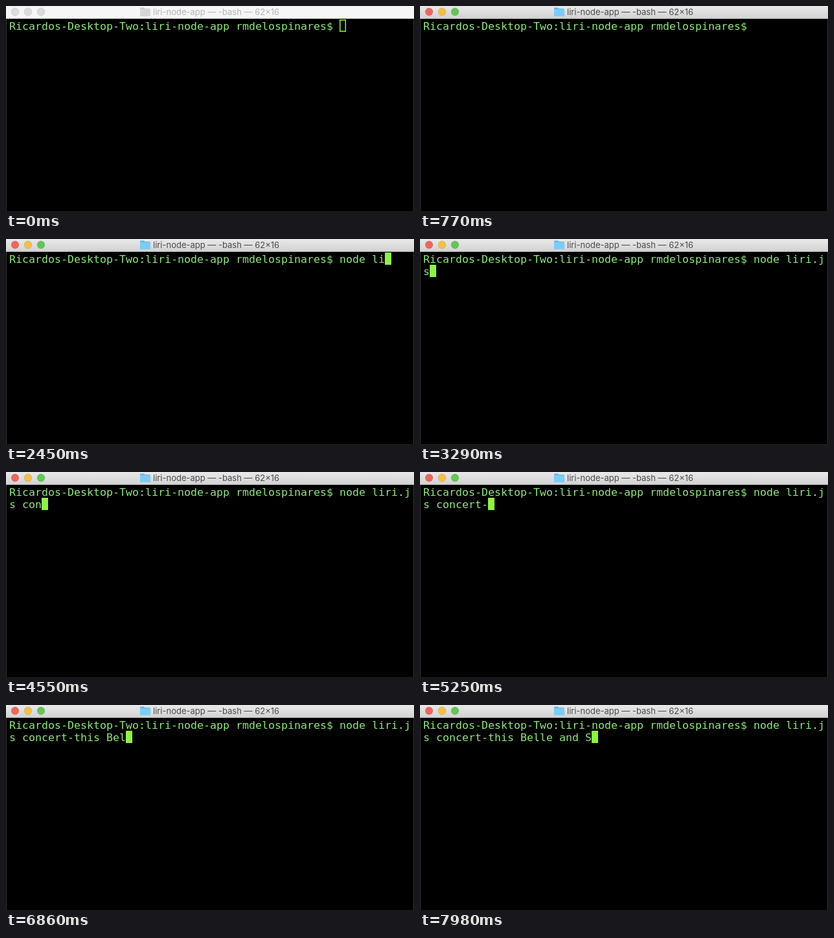
Recreate the animation shown at these times as an HTML page. Size 630x318 px, loop 8 s.

```html
<!DOCTYPE html>
<html lang="en">
<head>
<meta charset="utf-8">
<title>Terminal</title>
<style>
  html, body { margin: 0; width: 100%; height: 100%; overflow: hidden; background: #000; }
  svg { display: block; width: 630px; height: 318px; }
  .line { font: 300 16.61px "DejaVu Sans Mono", monospace; fill: #8fe67c; white-space: pre; }
  .title { font: 13px Inter, "Liberation Sans", sans-serif; fill: #4b4b4b; }
  .lamp { stroke-width: .7; stroke: rgba(0, 0, 0, .16); }
  .folder { fill: #7cccf6; }
  .folder-top { fill: #5fb8ea; }
  .inactive .title { fill: #b5b5b5; }
  .inactive .lamp { fill: #dcdcdc; stroke: #cacaca; }
  .inactive .folder { fill: #d6d6d6; }
  .inactive .folder-top { fill: #cbcbcb; }
  .inactive .bar { fill: #f6f6f6; }
</style>
</head>
<body>
<svg viewBox="0 0 630 318">
  <defs>
    <linearGradient id="chrome" x2="0" y2="1">
      <stop offset="0" stop-color="#e9e9e9"/>
      <stop offset="1" stop-color="#d1d1d1"/>
    </linearGradient>
  </defs>
  <rect width="630" height="318"/>
  <path d="M.5 20V318M629.5 20V318" stroke="#333"/>
  <g id="header">
    <rect class="bar" width="630" height="20" fill="url(#chrome)"/>
    <rect y="19" width="630" height="1" fill="#b4b4b4"/>
    <circle class="lamp" cx="14" cy="9" r="5.9" fill="#f0655b"/>
    <circle class="lamp" cx="34" cy="9" r="5.9" fill="#f5bf45"/>
    <circle class="lamp" cx="54" cy="9" r="5.9" fill="#62c754"/>
    <path class="folder-top" d="M207 15V4q0-1.500 1.500-1.500h4.500l1.500 1.500h6.500q2 0 2 1.500V15z"/>
    <rect class="folder" x="207" y="5" width="16" height="11" rx="1"/>
    <text class="title" x="227" y="14">liri-node-app — -bash — 62×16</text>
  </g>
  <rect id="cursor" width="10" height="19"/>
  <text id="row0" class="line" x="5" y="37"></text>
  <text id="row1" class="line" x="5" y="56"></text>
</svg>
<script>
const LOOP = 8000, COLS = 62, CELL = 10, LEFT = 5, TOP = 21, ROW = 19;
const FOCUS = 70, FADE_OUT = 560, FADE_IN = 1330, TICK = 70;
const GREEN = '#8ff147';
const prompt = 'Ricardos-Desktop-Two:liri-node-app rmdelospinares$ ';
const command = 'node liri.js concert-this Belle and S';

// Time of each keystroke in ms
const keys = [
  1400, 1540, 1680, 1890, 1960,
  2170, 2380, 2590, 2660, 2870, 3010, 3220, 3430,
  4410, 4480, 4550, 4620, 4760, 4900, 5110, 5250, 5390, 5600, 5670, 5740, 6230,
  6440, 6720, 6860, 7000, 7280, 7420, 7560, 7630, 7700, 7840, 7980
];

const byId = id => document.getElementById(id);
const header = byId('header'), cursor = byId('cursor');
const rows = [byId('row0'), byId('row1')];

function setAttrs(node, attrs) {
  for (const name in attrs) node.setAttribute(name, attrs[name]);
}

function fadeLevel(t, start) {
  const steps = Math.floor((t - start) / TICK) + 1;
  return Math.max(0, Math.min(1, steps / 4));
}

function cursorOpacity(t) {
  if (t >= keys[0]) return 1;
  return 1 - fadeLevel(t, FADE_OUT) + fadeLevel(t, FADE_IN);
}

function render(t) {
  const active = t >= FOCUS;
  const typed = keys.filter(time => time <= t).length;
  const text = prompt + command.slice(0, typed);
  header.setAttribute('class', active ? '' : 'inactive');
  rows.forEach((row, i) => {
    row.textContent = text.slice(i * COLS, (i + 1) * COLS);
  });

  const x = LEFT + text.length % COLS * CELL;
  const y = TOP + Math.floor(text.length / COLS) * ROW;
  const inset = active ? 0 : 0.75;
  setAttrs(cursor, {
    x: x + inset, y: y + inset,
    width: CELL - 2 * inset, height: ROW - 2 * inset,
    fill: active ? GREEN : 'none',
    stroke: active ? 'none' : GREEN,
    'stroke-width': 1.5,
    opacity: cursorOpacity(t)
  });
}

const start = performance.now();
function frame() {
  render((performance.now() - start) % LOOP);
  requestAnimationFrame(frame);
}
render(0);
requestAnimationFrame(frame);
</script>
</body>
</html>
```
